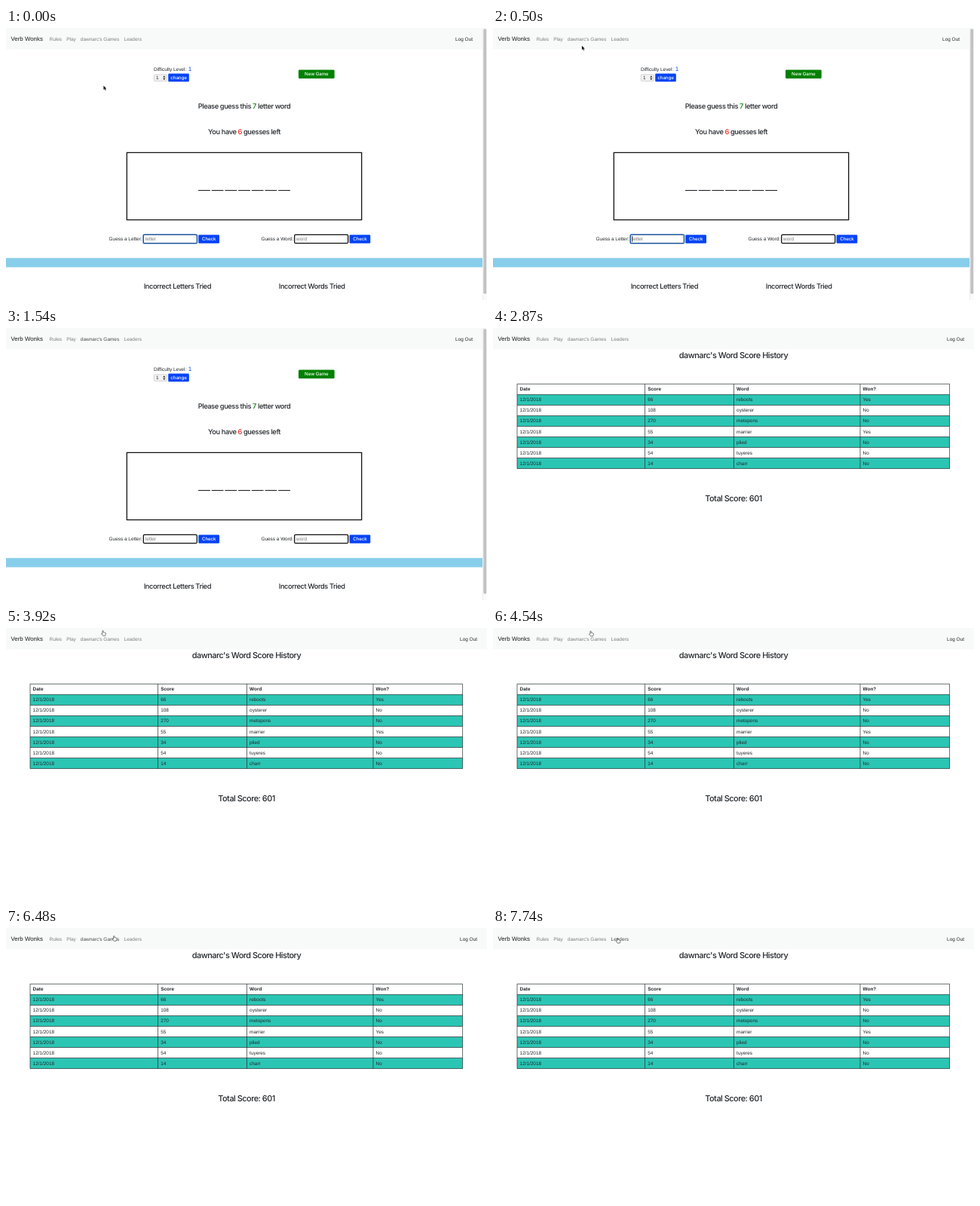
An HTML page with a canvas that plays this animation: 638x361 px, repeating every 8000 ms.

```html
<!DOCTYPE html>
<html lang="en">
<head>
<meta charset="utf-8">
<title>Word guessing game</title>
<style>
  html, body { margin: 0; width: 100%; height: 100%; overflow: hidden; background: #fff; }
  canvas { display: block; width: 638px; height: 361px; }
</style>
</head>
<body>
<canvas id="stage"></canvas>
<script>
const W = 638, H = 361, LOOP = 8000;
const BRAND = 'Verb Wonks', USER = 'dawnarc';
const INK = '#212529', BLUE = '#0443f5', GREEN = '#008000', RED = '#f0281e', TEAL = '#2bc5b4';
const PAGE_SWITCH = 2870;

const canvas = document.getElementById('stage');
const ctx = canvas.getContext('2d');
const dpr = window.devicePixelRatio || 1;
canvas.width = W * dpr;
canvas.height = H * dpr;

const body = (size = 6.45, weight = 400) => ({
  font: `${weight} ${size}px "Liberation Sans", Arial, sans-serif`, spacing: '0px'
});
const title = size => ({
  font: `500 ${size}px Inter, sans-serif`, spacing: `${-0.045 * size}px`
});

function setStyle(style) {
  ctx.font = style.font;
  ctx.letterSpacing = style.spacing;
  ctx.textRendering = 'geometricPrecision';
}

function text(str, x, y, color = INK, style = body(), align = 'left') {
  setStyle(style);
  ctx.textAlign = align;
  ctx.fillStyle = color;
  ctx.fillText(str, x, y);
}

// Centred line made of [text, colour] parts
function heading(parts, cx, y, size) {
  const style = title(size);
  setStyle(style);
  const widths = parts.map(p => ctx.measureText(p[0]).width);
  let x = cx - widths.reduce((a, b) => a + b, 0) / 2;
  parts.forEach(([str, color = INK], i) => {
    text(str, x, y, color, style);
    x += widths[i];
  });
}

function rect(x, y, w, h, color) {
  ctx.fillStyle = color;
  ctx.fillRect(x, y, w, h);
}

function box(x, y, w, h, r, fill, stroke, line = 1) {
  ctx.beginPath();
  ctx.roundRect(x, y, w, h, r);
  if (fill) { ctx.fillStyle = fill; ctx.fill(); }
  if (stroke) { ctx.strokeStyle = stroke; ctx.lineWidth = line; ctx.stroke(); }
}

function button(label, x, y, w, h, color) {
  box(x, y, w, h, 1.3, color);
  text(label, x + w / 2, y + h / 2 + 2.2, '#fff', { font: '500 6.2px Inter, sans-serif', spacing: '-0.1px' }, 'center');
}

function input(hint, x, focused, caret) {
  if (focused) box(x, 274.3, 71, 11.4, 1.5, null, '#a9cbf0', 2.8);
  box(x, 274.3, 71, 11.4, 1.5, '#fff', focused ? '#245494' : '#111', 1.3);
  text(hint, x + 2.4, 282.3, '#757575');
  if (caret) rect(x + 2, 276, 0.8, 8, '#111');
}

function nav(t, right) {
  rect(0, 0, right, 28.4, '#f8f9f9');
  text(BRAND, 6.5, 17.4, 'rgba(0,0,0,.9)', body(7.9));
  const onGames = (t >= 640 && t < PAGE_SWITCH) || (t >= 5430 && t < 7430);
  const links = [
    ['Rules', 57.6], ['Play', 80.3],
    [`${USER}'s Games`, 98.8, onGames], ['Leaders', 156.6, t >= 7430]
  ];
  for (const [label, x, hot] of links) text(label, x, 17, `rgba(0,0,0,${hot ? 0.72 : 0.5})`);
  text('Log Out', right - 13, 17, INK, body(), 'right');
}

function scrollbar() {
  rect(632, 0, 6, H, '#fafafa');
  rect(632, 0, 0.6, H, '#e6e6e6');
  box(633.3, 1, 3.9, 352, 1.9, '#c1c1c1');
}

function gamePage(t) {
  nav(t, 632);
  scrollbar();

  text('Difficulty Level:', 196, 56.7);
  text('1', 241.8, 56.9, BLUE, body(8));
  box(196.3, 61.8, 17, 8.6, 1.2, '#f3f3f3', '#c4c4c4', 0.7);
  text('1', 199, 68.3);
  ctx.fillStyle = '#222';
  for (const dir of [-1, 1]) {
    ctx.beginPath();
    ctx.moveTo(208.2, 66.1 + dir * 0.7);
    ctx.lineTo(211.4, 66.1 + dir * 0.7);
    ctx.lineTo(209.8, 66.1 + dir * 2.8);
    ctx.fill();
  }
  button('change', 215.2, 60.5, 27.6, 10.8, BLUE);
  button('New Game', 388, 55.5, 47.7, 11.5, GREEN);

  heading([['Please guess this '], ['7', GREEN], [' letter word']], 316, 106.7, 9.3);
  heading([['You have '], ['6', RED], [' guesses left']], 316, 140.8, 9.3);

  box(160.3, 165.4, 311.4, 89.2, 0, null, '#111', 1.3);
  for (let i = 0; i < 7; i++) rect(255 + i * 17.7, 215, 15.8, 1.1, INK);

  const focused = t < 900;
  text('Guess a Letter:', 136.6, 282.3);
  input('letter', 182.3, focused, focused && t >= 370);
  button('Check', 255.3, 274.4, 27.7, 11.4, BLUE);
  text('Guess a Word:', 338.4, 282.3);
  input('word', 382.7, false, false);
  button('Check', 455.6, 274.4, 27.7, 11.4, BLUE);

  rect(0, 305.3, 632, 12.2, '#87ceeb');
  heading([['Incorrect Letters Tried']], 227.3, 345.5, 9.3);
  heading([['Incorrect Words Tried']], 405.7, 345.5, 9.3);
}

const COLS = [32, 201.6, 319.5, 487, 605.7];
const ROWS = [
  ['Date', 'Score', 'Word', 'Won?'],
  ...[
    [66, 'reboots', 'Yes'], [108, 'oysterer', 'No'], [270, 'metopons', 'No'],
    [55, 'marrier', 'Yes'], [34, 'plied', 'No'], [54, 'tuyeres', 'No'], [14, 'charr', 'No']
  ].map(row => ['12/1/2018', ...row])
];

function historyPage(t) {
  nav(t, W);
  heading([[`${USER}'s Word Score History`]], 319, 40, 10.9);

  const top = 74.2, step = 14.06, width = COLS[4] - COLS[0];
  ROWS.forEach((cells, r) => {
    const y = top + r * step;
    if (r % 2) rect(COLS[0], y, width, step, TEAL);
    cells.forEach((cell, c) => text(cell, COLS[c] + 3.6, y + 9.1, INK, body(6.4, r ? 400 : 700)));
  });
  for (let r = 0; r <= ROWS.length; r++) rect(COLS[0], top + r * step - 0.35, width, 0.7, '#26302f');
  for (const x of COLS) rect(x - 0.35, top, 0.7, step * ROWS.length, '#26302f');

  heading([['Total Score: 601']], 319, 230, 10.9);
}

// Pointer stops: start time, left, top, shape
const POINTER = [
  [0, 129, 76, 'arrow'], [100, 125, 58, 'arrow'], [230, 119, 37, 'arrow'],
  [370, 118, 27, 'arrow'], [500, 117.5, 23, 'arrow'],
  [640, 115, 20, 'hand'], [760, 115, 18, 'hand'], [1540, 0, 0, null],
  [3560, 115, 11, 'hand'], [3680, 115, 9, 'hand'], [3920, 126, 3, 'hand'],
  [4070, 127, 3, 'hand'], [4540, 127, 3.6, 'hand'],
  [5430, 138.5, 10, 'hand'], [5560, 140, 10, 'hand'], [6480, 140.7, 10, 'hand'],
  [7430, 158, 10, 'hand'], [7600, 161, 11.8, 'hand'], [7740, 162.6, 12.8, 'hand']
];
const SHAPES = {
  arrow: { path: new Path2D('M.4 .4V6L1.7 4.8L2.6 6.9L3.5 6.5L2.6 4.5H4.3Z'), fill: '#111', line: '#fff' },
  hand: {
    path: new Path2D('M1.9 4V1.2Q1.9 .4 2.5 .4T3.1 1.2V2.8Q3.9 2.4 4.3 3Q5 2.7 5.3 3.3Q6.3 3.1 6.3 4V5.2L5.5 7.2H2.6L.6 4.7Q.7 3.6 1.9 4.4Z'),
    fill: '#fff', line: '#555'
  }
};

function pointer(t) {
  const [, x, y, kind] = POINTER.findLast(p => p[0] <= t);
  if (!kind) return;
  const { path, fill, line } = SHAPES[kind];
  ctx.save();
  ctx.translate(x, y);
  ctx.lineWidth = 0.8;
  ctx.lineJoin = 'round';
  ctx.strokeStyle = line;
  ctx.fillStyle = fill;
  if (kind === 'arrow') {
    ctx.stroke(path);
    ctx.fill(path);
  } else {
    ctx.fill(path);
    ctx.stroke(path);
  }
  ctx.restore();
}

function clickRing() {
  ctx.beginPath();
  ctx.arc(118, 18.4, 13, 0, Math.PI * 2);
  ctx.fillStyle = 'rgba(235,90,90,.06)';
  ctx.fill();
  ctx.strokeStyle = 'rgba(232,100,104,.85)';
  ctx.lineWidth = 1.8;
  ctx.stroke();
}

function draw(now) {
  const t = now % LOOP;
  ctx.setTransform(dpr, 0, 0, dpr, 0, 0);
  rect(0, 0, W, H, '#fff');
  (t < PAGE_SWITCH ? gamePage : historyPage)(t);
  if (t >= 900 && t < 1290) clickRing();
  pointer(t);
}

const start = performance.now();
function tick() {
  draw(performance.now() - start);
  requestAnimationFrame(tick);
}
tick();
</script>
</body>
</html>
```
